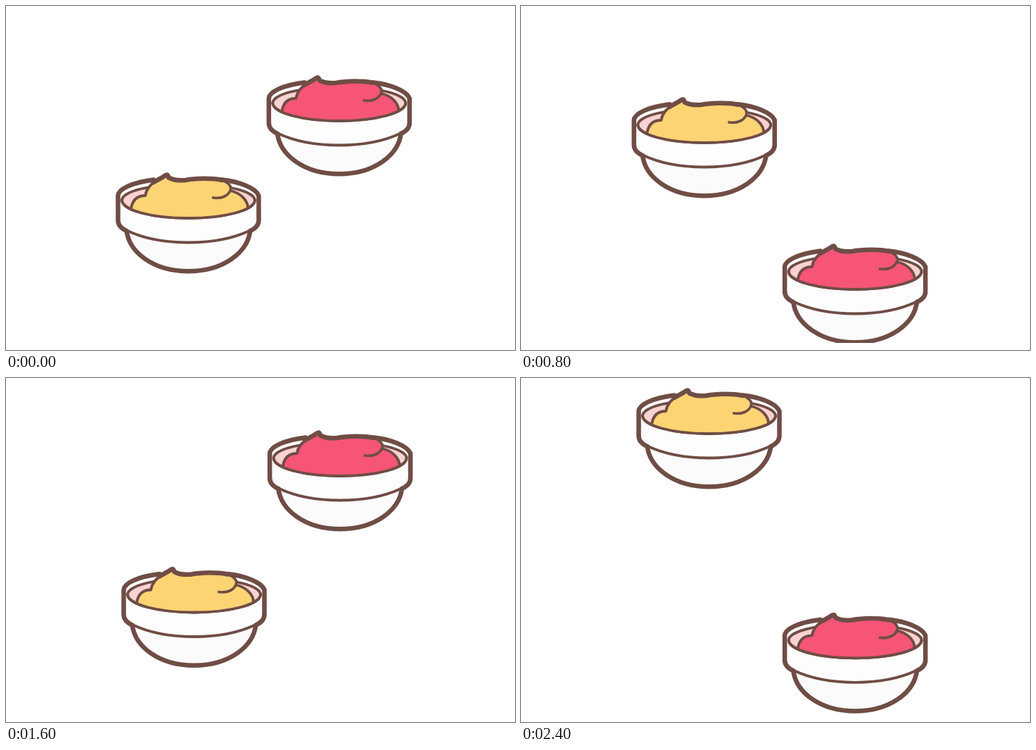
An HTML page with a canvas that plays this animation: 720 px wide and 488 px high, repeating every 2600 ms.

```html
<!DOCTYPE html>
<html lang="en">
<head>
<meta charset="utf-8">
<title>Two bowls</title>
<style>
html, body { margin: 0; width: 100%; height: 100%; overflow: hidden; background: #fff; }
canvas { display: block; }
</style>
</head>
<body>
<canvas id="stage" width="720" height="488"></canvas>
<script>
const ctx = document.getElementById('stage').getContext('2d');
const STEP = 200;
const FLOOR = 478;
const LINE = '#6f4d45';
const THICK = 6.5;
const THIN = 3.8;

// Position of each bowl at every step of the loop; the last x is held
const red = {
  color: '#f65577',
  x: [368.3, 372, 369.6],
  y: [98, 167, 217.5, 278, 337, 200, 59.5, 3, 74, 143, 212, 282, 332.3]
};
const yellow = {
  color: '#fdd473',
  x: [155, 150, 150.7, 156, 156.3, 163],
  y: [236, 293, 335, 240, 129, 5, 128.5, 196, 267.5, 333, 196, 72, 14]
};
const COUNT = red.y.length;

// The mouth is flatter at the back than at the front
function mouthArc(path, ry, from, to) {
  path.ellipse(103, 39.5, 94, ry, 0, from, to);
  return path;
}

const rimLeft = 'M15.5 83 C9 80 3.5 76 3.5 68 L3.5 33 C4 24 22 14.5 54 10.5';
const rimRight = 'C174 13 198 22 202.5 33 L202.5 68 C202.5 76 197 80 190.5 83';
const rim = new Path2D(`${rimLeft} M151 10.5 ${rimRight}`);
const rimFill = new Path2D(`${rimLeft} L151 10.5 ${rimRight}`);
const lip = new Path2D('M16 82.5 C40 94 70 99.5 103 99.5 C136 99.5 166 94 190 82.5');
const body = new Path2D('M15.5 82 C19 114 54 140.2 103 140.2 C152 140.2 187 114 190.5 82');

const front = mouthArc(new Path2D(), 25.5, 0, Math.PI);
const mouth = mouthArc(new Path2D(front), 23, Math.PI, Math.PI * 2);

const leftEdge = 'M22 51 C24 39 30 33 42 33 C43.5 23 50 16 60 10.5';
const crest = 'C64 8.5 68 6 71 4 Q74.5 2.5 75 7.5 C82 11 90 12 99 11 C112 8.5 135 7.5 151 11';
const shoulder = 'C157 13.5 163 18 163 23';
const rightEdge = 'C177 29 187 40 187 50';
const sauce = new Path2D(`${leftEdge} ${crest} ${shoulder} L163 26 ${rightEdge}`);
mouthArc(sauce, 25.5, 0.46, Math.PI - 0.52);
const thin = new Path2D(`${leftEdge} M151 11 ${shoulder} C161 33 150 38 138 36 M162 26 ${rightEdge}`);
const thick = new Path2D(`M54 14 L60 10.5 ${crest}`);

function fill(path, color) {
  ctx.fillStyle = color;
  ctx.fill(path);
}

function stroke(path, width) {
  ctx.lineWidth = width;
  ctx.stroke(path);
}

function drawBowl(bowl, i) {
  ctx.save();
  ctx.translate(bowl.x[Math.min(i, bowl.x.length - 1)], bowl.y[i]);
  fill(body, '#fbfbfb');
  stroke(body, THICK);
  fill(lip, '#fdfdfd');
  fill(rimFill, '#fdfdfd');
  stroke(lip, THIN);
  stroke(rim, THICK);
  fill(mouth, '#fad2d2');
  stroke(mouth, THIN);
  fill(sauce, bowl.color);
  stroke(thin, THIN);
  stroke(thick, THICK);
  stroke(front, THIN);
  ctx.restore();
}

function draw(now) {
  const i = Math.floor(now / STEP) % COUNT;
  ctx.fillStyle = '#fff';
  ctx.fillRect(0, 0, 720, 488);
  ctx.save();
  ctx.beginPath();
  ctx.rect(0, 0, 720, FLOOR);
  ctx.clip();
  ctx.strokeStyle = LINE;
  ctx.lineCap = ctx.lineJoin = 'round';
  drawBowl(yellow, i);
  drawBowl(red, i);
  ctx.restore();
}

let start;
function tick(now) {
  start ??= now;
  draw(now - start);
  requestAnimationFrame(tick);
}
draw(0);
requestAnimationFrame(tick);
</script>
</body>
</html>
```
